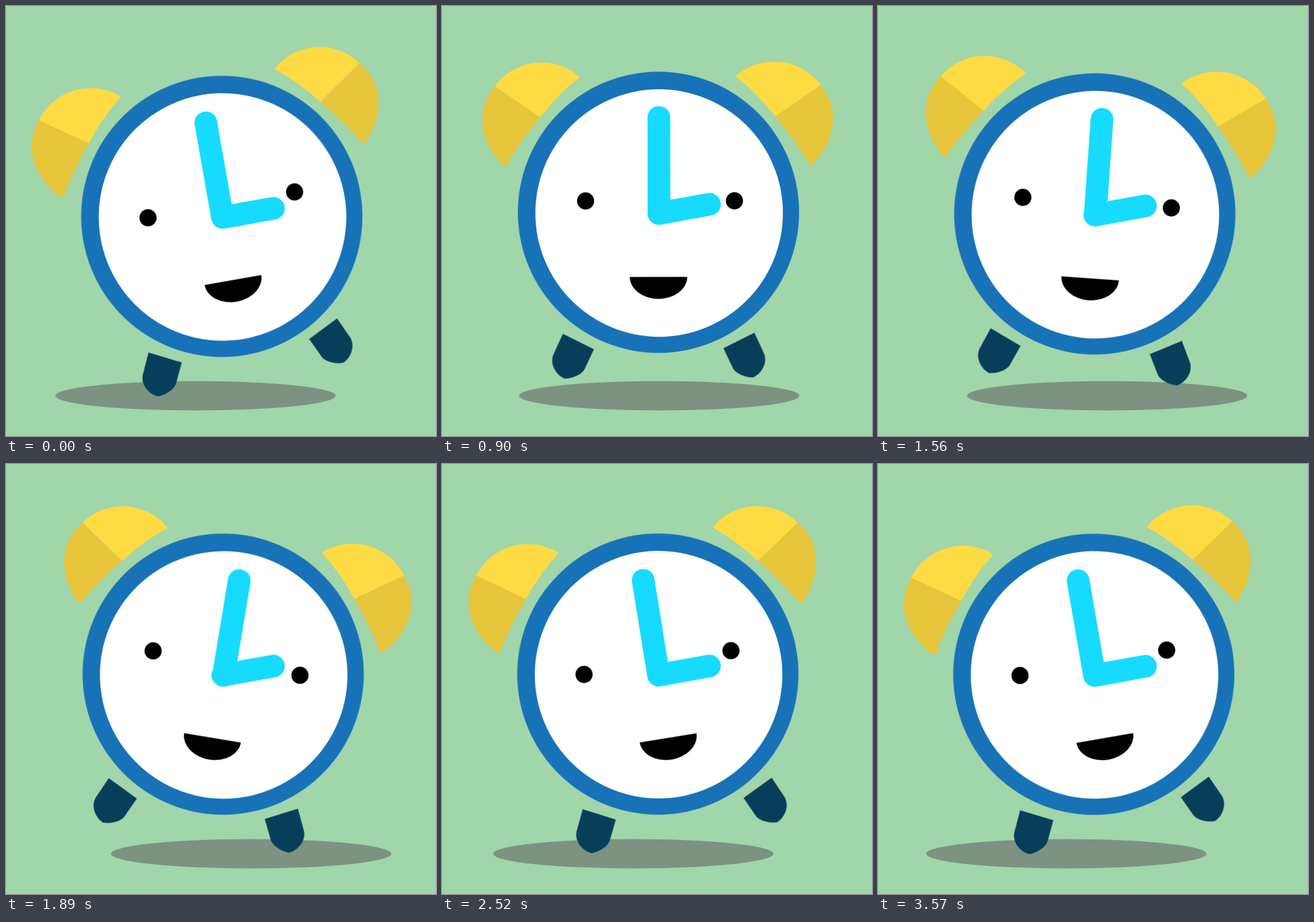
An HTML page that plays this animation: 748 px wide and 748 px high, repeating every 3.6 s.

```html
<!DOCTYPE html>
<html lang="en">
<head>
<meta charset="utf-8">
<title>Rocking alarm clock</title>
<style>
  html, body { margin: 0; width: 100%; height: 100%; overflow: hidden; background: #a1d5aa; }
  svg { display: block; width: 100%; height: 100%; }

  .shadow, .bob, .swing {
    animation: slide 600ms linear infinite alternate;
  }
  .bob { animation-name: bob; animation-duration: 300ms; }
  .swing { animation-name: swing; transform-origin: 376.7px 366px; }

  @keyframes swing {
    0%   { transform: rotate(-10deg); }
    15%  { transform: rotate(-9.45deg); }
    20%  { transform: rotate(-9.22deg); }
    25%  { transform: rotate(-8.4deg); }
    30%  { transform: rotate(-7.2deg); }
    40%  { transform: rotate(-4deg); }
    50%  { transform: rotate(0deg); }
    60%  { transform: rotate(4deg); }
    70%  { transform: rotate(7.2deg); }
    75%  { transform: rotate(8.4deg); }
    80%  { transform: rotate(9.22deg); }
    85%  { transform: rotate(9.45deg); }
    100% { transform: rotate(10deg); }
  }
  @keyframes bob {
    0%   { transform: translateY(7px); }
    40%  { transform: translateY(6.5px); }
    50%  { transform: translateY(5.9px); }
    60%  { transform: translateY(5px); }
    80%  { transform: translateY(2.8px); }
    100% { transform: translateY(0); }
  }
  @keyframes slide {
    0%   { transform: translateX(-48.6px); }
    5%   { transform: translateX(-50.8px); }
    15%  { transform: translateX(-48.1px); }
    20%  { transform: translateX(-45.8px); }
    30%  { transform: translateX(-36px); }
    40%  { transform: translateX(-20px); }
    50%  { transform: translateX(0); }
    60%  { transform: translateX(20px); }
    70%  { transform: translateX(36px); }
    80%  { transform: translateX(45.8px); }
    85%  { transform: translateX(48.1px); }
    95%  { transform: translateX(50.8px); }
    100% { transform: translateX(48.6px); }
  }

  .hand { stroke: #16dbff; stroke-width: 39.5; stroke-linecap: round; }
</style>
</head>
<body>
<svg viewBox="0 0 748 748">
  <defs>
    <g id="bell">
      <path fill="#ffdb43" d="M240 123.5C222 107 198 98 173 98C141 98 111 113.5 92 139L171 193.5Q203 152 240 123.5Z"/>
      <path fill="#e7c53a" d="M92 139C78 157 70.5 175 70.5 195C70.5 226 85 257 110 279.3Q137 234 171 193.5Z"/>
    </g>
    <path id="leg" fill="#073f5b" d="M210 570L264 597L247.5 632C243 640 229 647.5 213.5 648C202 644 191 630 191.5 616C191.5 611 192.5 608 194.5 604Z"/>
  </defs>

  <ellipse class="shadow" cx="378.3" cy="678" rx="243.7" ry="25.5" fill="#7b9380"/>

  <g class="bob">
    <g class="swing">
      <use href="#bell"/>
      <use href="#bell" transform="translate(751 -1.2) scale(-1 1)"/>
      <use href="#leg"/>
      <use href="#leg" transform="translate(753.3 -1.6) scale(-1 1)"/>
      <circle cx="376.6" cy="358.8" r="244.6" fill="#1772b8"/>
      <circle cx="377.7" cy="360.1" r="215.3" fill="#fff"/>
      <circle cx="249.8" cy="339" r="14.9"/>
      <circle cx="508.7" cy="339" r="14.9"/>
      <path d="M326.5 471.2H426.5A50 38.3 0 0 1 326.5 471.2Z"/>
      <path class="hand" d="M377.5 360.5V193.8"/>
    </g>
    <path class="hand" d="M377.3 360.7L465.2 344.9"/>
  </g>
</svg>
</body>
</html>
```
